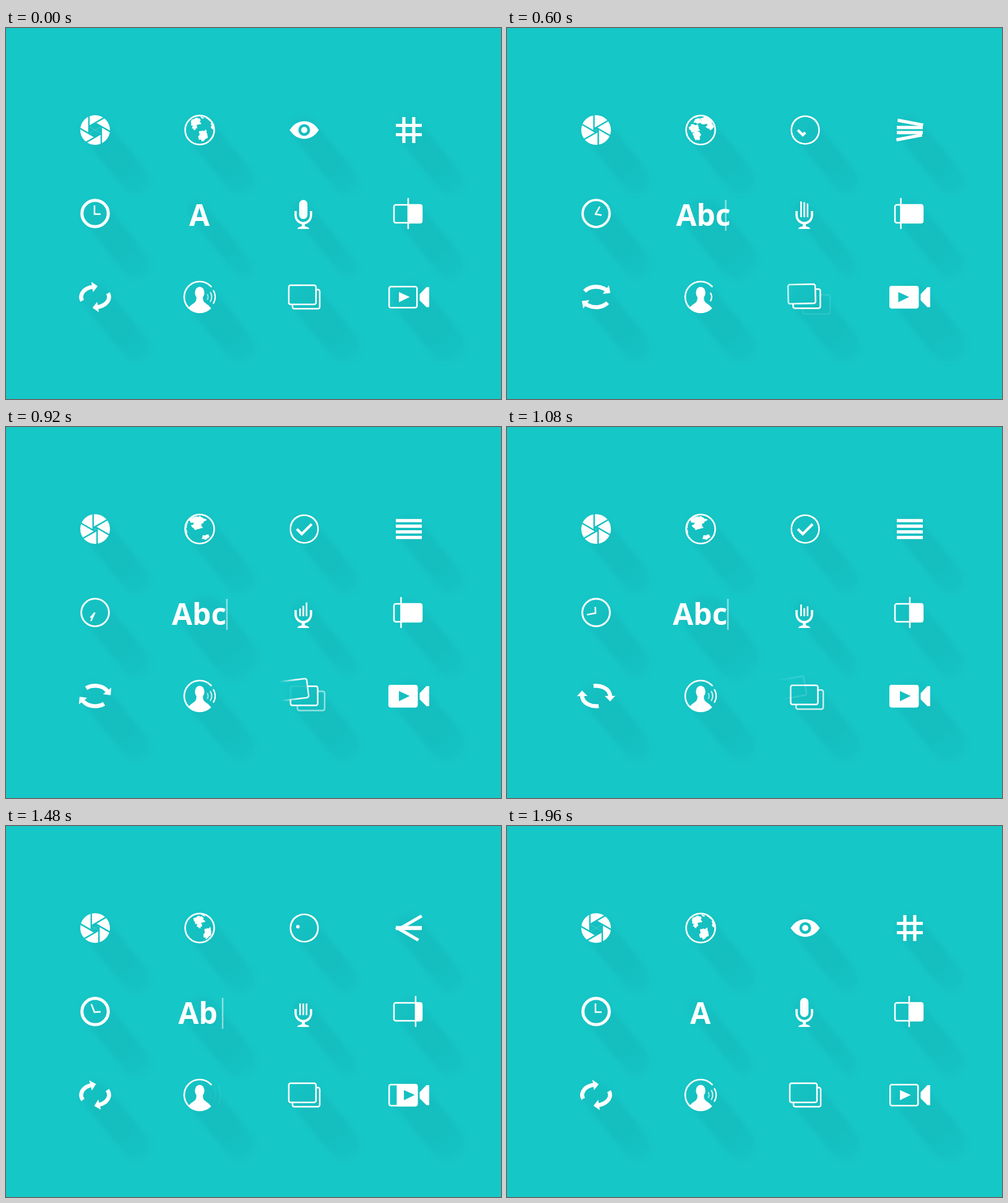
These frames come from a looping animation (800x600 px, 2000 ms). An HTML page with a canvas:

```html
<!DOCTYPE html>
<html lang="en">
<head>
<meta charset="utf-8">
<title>Icon set</title>
<style>
html, body { margin: 0; width: 100%; height: 100%; overflow: hidden; background: #16c7c8; }
canvas { position: absolute; left: 0; top: 0; }
i {
  position: absolute; width: 154px; margin-left: -24px; border-radius: 32px;
  transform-origin: 24px 50%; transform: rotate(51deg); filter: blur(4px);
  background: linear-gradient(90deg, rgba(0,40,40,.03), rgba(0,40,40,.055) 25% 65%, rgba(0,40,40,.02));
}
</style>
</head>
<body>
<script>
const LOOP = 2000, STEP = 40, TAU = Math.PI * 2, DEG = Math.PI / 180;
const canvas = document.createElement('canvas');
canvas.width = 800;
canvas.height = 600;
const c = canvas.getContext('2d');
let t = 0;

// Motion helpers: eased progress between two times, and there-and-back
const mix = (a, b, u) => a + (b - a) * u;
const clamp = v => Math.max(0, Math.min(1, v));
const ease = (from, to, time = t) => {
  const u = clamp((time - from) / (to - from));
  return u * u * (3 - 2 * u);
};
const swing = (a, b, back, end) => ease(a, b) - ease(back, end);

// Drawing helpers
function group(x, y, draw) {
  c.save();
  c.translate(x, y);
  draw();
  c.restore();
}
function erase(draw) {
  c.save();
  c.globalCompositeOperation = 'destination-out';
  draw();
  c.restore();
}
function trace(points) {
  c.beginPath();
  for (let i = 0; i < points.length; i += 2) c.lineTo(points[i], points[i + 1]);
}
function poly(...points) {
  trace(points);
  c.closePath();
  c.fill();
}
function line(width, ...points) {
  c.lineWidth = width;
  trace(points);
  c.stroke();
}
function ring(r, width, from = 0, to = TAU) {
  c.lineWidth = width;
  c.beginPath();
  c.arc(0, 0, r, from, to);
  c.stroke();
}
function oval(x, y, rx, ry = rx) {
  c.beginPath();
  c.ellipse(x, y, rx, ry, 0, 0, TAU);
  c.fill();
}
function box(x, y, w, h, r) {
  c.beginPath();
  c.roundRect(x, y, w, h, r);
}
function frameBox(x, y, w, h) {
  c.lineWidth = 2.5;
  box(x, y, w, h, 3);
  c.stroke();
}

function aperture() {
  const h = mix(10, 3.2, swing(150, 660, 1250, 1750));
  oval(0, 0, 24);
  erase(() => {
    for (let i = 0; i < 6; i++) {
      c.rotate(60 * DEG);
      line(2.4, -h, h * .577, -h, -26);
      poly(0, 0, -h, h * .577, -h, -h * .577);
    }
  });
}

// Each land mass: longitude, latitude and half sizes in degrees
const LANDS = [
  [-102, 50, 34, 20], [-98, 25, 11, 13], [-60, -14, 20, 25], [-40, 73, 18, 9],
  [10, 18, 26, 16], [25, -12, 16, 23], [20, 53, 24, 14],
  [90, 53, 54, 22], [92, 24, 24, 14], [134, -25, 19, 12]
];
function globe() {
  const spin = -75 + 180 * (ease(270, 820) + ease(1050, 1600)), tilt = 12 * DEG;
  ring(23.5, 2.6);
  for (const [lon, lat, w, h] of LANDS) {
    const points = [];
    let seen = false;
    for (let k = 0; k < 36; k++) {
      const turn = k / 36 * TAU;
      const coast = 1 + .14 * Math.sin(5 * turn + lon) + .09 * Math.sin(9 * turn + lat);
      const a = (lon + w * coast * Math.cos(turn) - spin) * DEG;
      const b = (lat + h * coast * Math.sin(turn)) * DEG;
      const x = Math.cos(b) * Math.sin(a), d = Math.cos(b) * Math.cos(a);
      const y = Math.sin(b) * Math.cos(tilt) - d * Math.sin(tilt);
      const z = Math.sin(b) * Math.sin(tilt) + d * Math.cos(tilt);
      const r = 23 / (z < 0 ? Math.hypot(x, y) : 1);
      seen = seen || z > 0;
      points.push(x * r, -y * r);
    }
    if (seen) poly(...points);
  }
}

function eye() {
  const open = swing(160, 500, 1440, 1880);
  const x = mix(12, 23.5, open), y = mix(19, 31.3, open);
  c.beginPath();
  c.moveTo(-23.5, 0);
  c.bezierCurveTo(-x, -y, x, -y, 23.5, 0);
  c.bezierCurveTo(x, y, -x, y, -23.5, 0);
  c.fill();
  erase(() => oval(0, 0, mix(9.5, 21.2, open)));
  const check = swing(480, 720, 1260, 1420);
  if (check > 0) {
    c.setLineDash([34 * check, 99]);
    line(4.2, -12, 0, -4, 8, 12, -8);
  } else {
    const move = swing(340, 500, 1380, 1800);
    oval(-12 * move, -5 * Math.sin(Math.PI * move), mix(5, 2.5, move));
  }
}

function bars() {
  const first = ease(310, 680), second = ease(1250, 1840);
  const turn = 90 * (first + second) * DEG, stack = first - second;
  const gap = mix(7.5, 4.6, stack) - 6.5 * Math.sin(2 * turn) ** 2;
  for (const side of [-1, 1]) {
    line(5.2, -21, side * gap, 21, side * gap);
    group(side * 8 * (1 - stack), -side * 13.6 * stack, () => {
      c.rotate(-side * turn);
      line(5.2, 0, -21, 0, 21);
    });
  }
}

// One full turn, slow at both ends and fastest at the pivot time
const whirl = (pivot, into, out) => t < pivot
  ? .5 * (t / pivot) ** into
  : 1 - .5 * ((LOOP - t) / (LOOP - pivot)) ** out;

function clock() {
  const width = 5 - 2.2 * swing(300, 900, 1000, 1500);
  const hand = (turn, length) => group(-1, 1, () => {
    c.rotate(turn * TAU);
    line(2.5, 0, 1, 0, -length);
  });
  ring(23.8 - width / 2, width);
  hand(whirl(860, 5, 2.7), 14);
  hand(.25 + whirl(970, 6, 6), 10);
}

function letters() {
  const typed = swing(400, 680, 1360, 1640), cursor = swing(240, 400, 1480, 1720);
  const width = mix(34, 87, typed), middle = -1.5 * cursor;
  c.font = '700 48px "Open Sans", "Noto Sans", sans-serif';
  c.fillText('Abc'.slice(0, 1 + Math.round(2 * typed)), middle - width / 2, 20);
  c.globalAlpha = cursor / 2;
  const x = middle + width / 2 + mix(11, 2, typed);
  line(2.5, x, -22, x, 28);
  setShadow(shadows[5], 1, mix(32, 72, typed));
}

function microphone() {
  const split = swing(160, 360, 1520, 1800), level = swing(400, 560, 1000, 1480);
  c.translate(-1.5, 0);
  c.save();
  box(-6.7, -22, 13.4, mix(31, 28, split), mix(6.7, 1, split));
  c.clip();
  const width = mix(5.4, 2.7, split);
  for (let i = 0; i < 3; i++) {
    const wave = -Math.cos((t - 600 - 80 * i) / (640 + 160 * i) * TAU);
    c.fillRect(5.3 * (i - 1) - width / 2, -22 + 9 * split + 6.5 * level * wave, width, 40);
  }
  c.restore();
  c.lineWidth = 3.6;
  c.beginPath();
  c.moveTo(-12.5, -4);
  c.lineTo(-12.5, 2);
  c.bezierCurveTo(-12.5, 20, 12.5, 20, 12.5, 2);
  c.lineTo(12.5, -4);
  c.stroke();
  line(5, 0, 15, 0, 22);
  poly(-10, 25, -8, 22.5, -2, 20.5, 2, 20.5, 8, 22.5, 10, 25);
}

function compare() {
  const x = -1 - 13.5 * swing(100, 520, 880, 1050) + 12 * swing(1050, 1220, 1480, 1900);
  frameBox(-24, -14, 45, 29);
  c.save();
  box(-25, -15, 47, 31, 4);
  c.clip();
  c.fillRect(x, -20, 60, 40);
  c.restore();
  line(2.5, x, -25, x, 25);
}

function refresh() {
  const glide = 1 - (1 - clamp((t - 1000) / 800)) ** 3;
  const head = (258 + 72 * ease(250, 750) + 108 * glide) * DEG;
  const x = 22.5 * Math.cos(head), y = 16.5 * Math.sin(head);
  const heading = Math.atan2(16.5 * Math.cos(head), -22.5 * Math.sin(head));
  for (let i = 0; i < 2; i++) {
    c.rotate(Math.PI);
    c.lineWidth = 6.6;
    c.beginPath();
    c.ellipse(0, 0, 22.5, 16.5, 0, head - 100 * DEG, head + .04);
    c.stroke();
    group(x, y, () => {
      c.rotate(heading);
      poly(9, 0, 0, 8.5, 0, -8.5);
    });
  }
}

function voice() {
  ring(25, 2.6, 45 * DEG, 320 * DEG);
  c.save();
  c.beginPath();
  c.arc(0, 0, 25.5, 0, TAU);
  c.clip();
  oval(0, -7, 7.7, 9.5);
  c.beginPath();
  c.moveTo(-5.5, -2);
  c.bezierCurveTo(-3, 15, -18, 7, -20, 26);
  c.lineTo(20, 26);
  c.bezierCurveTo(18, 7, 3, 15, 5.5, -2);
  c.fill();
  c.restore();

  // Two pulses per loop: drift out and fade, then grow back from the mouth
  const u = t % 1000, leaving = u < 520;
  const spread = leaving ? 1 + .5 * ease(200, 560, u) : mix(.5, 1, ease(520, 760, u));
  c.translate(5, 0);
  for (let i = 0; i < 3; i++) {
    const start = 540 + 80 * (2 - i);
    c.globalAlpha = (.55 + .22 * i) * (leaving ? 1 - ease(260, 520, u) : ease(start, start + 60, u));
    ring((8.5 + 5.8 * i) * spread, 2.2, -33 * DEG, 33 * DEG);
  }
}

function card(x, y, alpha, turn = 0, paint = '#fff') {
  group(x, y, () => {
    c.rotate(turn * DEG);
    c.globalAlpha = alpha;
    c.strokeStyle = paint;
    box(-22, -15.5, 44, 31, 3);
    erase(() => c.fill());
    frameBox(-22, -15.5, 44, 31);
  });
}
function cards() {
  const p = ease(400, 1400);
  card(mix(20, 3, p), mix(13, 3.5, p), p);
  card(mix(3, -3, p), mix(3.5, -3.5, p), 1);
  const paint = c.createLinearGradient(-22, 0, 4, 0);
  paint.addColorStop(0, `rgba(255,255,255,${1 - clamp(p / .45)})`);
  paint.addColorStop(1, '#fff');
  card(-3 - 25 * p, -3.5 - 13 * p, 1 - clamp((p - .5) / .3), -13 * p, paint);
}

function video() {
  const leave = 47 * ease(1360, 1700), shift = leave - 47 * (1 - ease(120, 480));
  const play = x => poly(x - 16, -8, x + 1.5, 0, x - 16, 8.5);
  frameBox(-31.8, -16.8, 45, 34);
  play(0);
  c.save();
  box(-33, -18, 47.4, 36.4, 4);
  c.clip();
  c.beginPath();
  c.rect(-33 + shift, -18, 47.4, 37);
  c.clip();
  c.fillRect(-33, -18, 48, 37);
  erase(() => {
    c.globalAlpha = ease(420, 560);
    play(.6 * leave - 8 * (1 - ease(440, 700)));
  });
  c.restore();
  c.lineWidth = 2;
  c.lineJoin = 'round';
  poly(18.5, -4, 29, -15, 32, -15, 32, 15.5, 29, 15.5, 18.5, 5);
  c.stroke();
}

// Icons in reading order with the widths of their long shadows
const ICONS = [
  [aperture, 46], [globe, 48], [eye, 42], [bars, 44],
  [clock, 46], [letters, 32], [microphone, 32], [compare, 46],
  [refresh, 46], [voice, 50], [cards, 52], [video, 58]
];
const colX = n => 144 + 169 * (n % 4), rowY = row => 165 + 135 * row;

function setShadow(el, row, width) {
  el.style.height = width + 'px';
  el.style.top = rowY(row) - width / 2 + 'px';
}
const shadows = ICONS.map(([, width], n) => {
  const el = document.body.appendChild(document.createElement('i'));
  el.style.left = colX(n) + 'px';
  setShadow(el, n >> 2, width);
  return el;
});
document.body.appendChild(canvas);

function frame() {
  t = Math.floor(performance.now() % LOOP / STEP) * STEP;
  c.clearRect(0, 0, 800, 600);
  c.fillStyle = c.strokeStyle = '#fff';
  ICONS.forEach(([draw], n) => group(colX(n), rowY(n >> 2), draw));
  requestAnimationFrame(frame);
}
frame();
</script>
</body>
</html>
```
